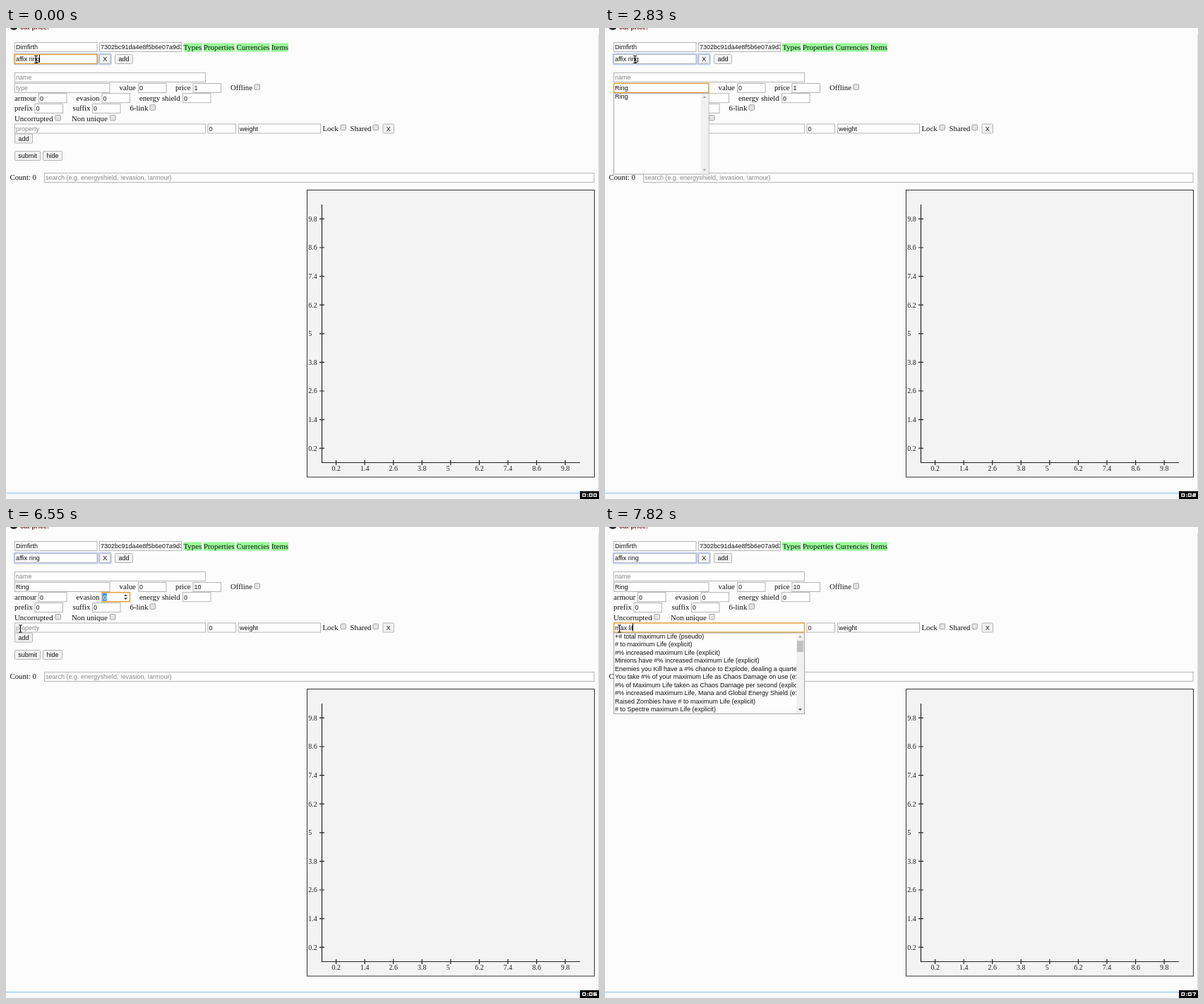
An HTML page that plays this animation: 840x667 px, repeating every 8 s.

```html
<!DOCTYPE html>
<html lang="en">
<head>
<meta charset="utf-8">
<title>Item search form</title>
<style>
html, body { margin: 0; width: 100%; height: 100%; overflow: hidden; background: #fcfcfc; }
svg { display: block; }
text { font: 9px "Liberation Sans", Arial, sans-serif; fill: #111; white-space: pre; }
.label { font: 10.8px "Liberation Serif", "Times New Roman", serif; }
.axis { font: 10px "Liberation Serif", "Times New Roman", serif; fill: #222; }
.hint { fill: #858585; }
.title { font-weight: bold; fill: #702020; }
</style>
</head>
<body>
<svg id="stage" width="840" height="667" viewBox="0 0 840 667"></svg>
<script>
const LOOP = 8000;
const stage = document.getElementById('stage');
const pen = document.createElement('canvas').getContext('2d');
pen.font = '9px "Liberation Sans", Arial, sans-serif';

// id: x, y, width, value, hint
const fields = {
  league: [12, 20, 117.5, 'Dimfirth'],
  key: [132, 20, 117, '7302bc91da4e8f5b6e07a9d3c1'],
  tab: [12, 37, 117.5, 'affix ring'],
  name: [12, 63, 271, '', 'name'],
  type: [12, 78, 135.5, '', 'type'],
  value: [187, 78, 40.5, '0'],
  price: [264.5, 78, 40.5, '1'],
  armour: [46, 92.2, 40.5, '0'],
  evasion: [135.5, 92.2, 40.5, '0'],
  shield: [250, 92.2, 40.5, '0'],
  prefix: [40.5, 107, 40.5, '0'],
  suffix: [122, 107, 40.5, '0'],
  prop: [12, 135.5, 271, '', 'property'],
  amount: [285.5, 135.5, 40.5, '0'],
  weight: [329, 135.5, 117, 'weight'],
  search: [54, 205, 779.5, '', 'search (e.g. energyshield, !evasion, !armour)']
};
const numeric = ['value', 'price', 'armour', 'evasion'];

// id: x, y, width, caption
const buttons = {
  closeTab: [132, 37, 16.5, 'X'],
  addTab: [154, 37, 26, 'add'],
  closeProp: [533.5, 135.5, 16.5, 'X'],
  addProp: [12, 149.5, 26, 'add'],
  submit: [12, 174, 37, 'submit'],
  hide: [52, 174, 28, 'hide']
};

const checks = {
  offline: [351.5, 79.3], sixLink: [203.5, 108.3], uncorrupted: [69.5, 123],
  nonUnique: [147, 123], lock: [473.5, 136.6], shared: [519.5, 136.6]
};

const labels = [
  ['value', 160.5, 88], ['price', 240, 88], ['Offline', 318, 88],
  ['armour', 12, 102.5], ['evasion', 99.5, 102.5], ['energy shield', 189, 102.5],
  ['prefix', 12, 117], ['suffix', 94.5, 117], ['6-link', 175.5, 117],
  ['Uncorrupted', 12, 131.5], ['Non unique', 93, 131.5],
  ['Lock', 448.5, 145.6], ['Shared', 487.5, 145.6], ['Count: 0', 5.5, 215]
];

const links = [['Types', 251.5, 26], ['Properties', 280, 44],
  ['Currencies', 326.5, 47], ['Items', 376, 24]];

const names = ['Ashen Lantern', 'Barrow Knot', 'Cinder Veil', 'Dusk Antler', 'Ember Husk',
  'Fallow Crown', 'Gravel Song', 'Hollow Thimble', 'Iron Murmur', 'Jagged Vow'];

const types = ['Any', 'Any Weapon', 'One-Handed Weapon', 'One-Handed Melee Weapon',
  'Two-Handed Melee Weapon', 'Bow', 'Claw', 'Any Dagger', 'Rune Dagger', 'One-Handed Axe',
  'One-Handed Mace', 'One-Handed Sword', 'Sceptre', 'Warstaff', 'Any Armour', 'Body Armour',
  'Quiver', 'Ring', 'Trinket', 'Divination Card'];

const pseudo = ['+#% total to Cold Resistance', '+#% total to Fire Resistance',
  '+#% total to Lightning Resistance', '+#% total Elemental Resistance',
  '+#% total to Chaos Resistance', '+#% total Resistance', '# total Resistances',
  '# total Elemental Resistances', '+#% total to all Elemental Resistances',
  '+# total to Strength', '+# total maximum Life', '+# total maximum Mana',
  '+# total maximum Energy Shield', '#% total increased maximum Energy Shield',
  '#% increased Movement Speed', '#% total increased Physical Damage',
  '+#% Global Critical Strike Multiplier'];

const explicit = ['# to maximum Life', '#% increased maximum Life',
  'Minions have #% increased maximum Life',
  'Enemies you Kill have a #% chance to Explode, dealing a quarter of their maximum Life',
  'You take #% of your maximum Life as Chaos Damage on use',
  '#% of Maximum Life taken as Chaos Damage per second',
  '#% increased maximum Life, Mana and Global Energy Shield',
  'Raised Zombies have # to maximum Life', '# to Spectre maximum Life'];

const props = pseudo.map(s => s + ' (pseudo)').concat(explicit.map(s => s + ' (explicit)'));
const thumbs = { type: [17, 30, 0, 0, 0], prop: [11, 11, 11, 12, 14, 14, 15, 16], name: [11] };
const lists = { name: names, type: types, prop: props };

const steps = [
  [0, { focus: 'tab', caret: 1, sec: 0 }],
  [530, { caret: 0 }],
  [850, { focus: 'closeTab' }],
  [970, { sec: 1 }],
  [1210, { focus: 'addTab' }],
  [1370, { focus: 'name', caret: 1 }],
  [1550, { focus: 'type' }],
  [1960, { sec: 2 }],
  [2050, { type: 'R' }],
  [2130, { type: 'Ri' }],
  [2220, { type: 'Rin' }],
  [2300, { type: 'Ring' }],
  [2830, { caret: 0 }],
  [2920, { focus: 'value', selected: 1 }],
  [3020, { sec: 3 }],
  [3170, { focus: 'price' }],
  [4020, { sec: 4 }],
  [4100, { selected: 0, caret: 1 }],
  [4170, { price: '10' }],
  [4340, { focus: 'offline' }],
  [4460, { focus: 'armour', selected: 1 }],
  [4640, { focus: 'evasion' }],
  [4980, { sec: 5 }],
  [5990, { sec: 6 }],
  [6760, { focus: 'prop', selected: 0, caret: 1 }],
  [7060, { sec: 7 }],
  [7260, { caret: 0 }],
  [7360, { prop: 'm', caret: 1 }],
  [7560, { prop: 'ma' }],
  [7620, { prop: 'max' }],
  [7760, { prop: 'max li' }],
  [7820, { prop: 'max lif' }]
];

const rect = (x, y, w, h, fill, stroke = 'none', width = 1, extra = '') =>
  `<rect x="${x}" y="${y}" width="${w}" height="${h}" fill="${fill}" stroke="${stroke}" stroke-width="${width}" ${extra}/>`;
const text = (s, x, y, cls = '', extra = '') =>
  `<text x="${x}" y="${y}" class="${cls}" ${extra}>${s}</text>`;
const path = (d, stroke, width = 1, fill = 'none') =>
  `<path d="${d}" fill="${fill}" stroke="${stroke}" stroke-width="${width}"/>`;
const clip = (x, y, w, h, inner) =>
  `<svg x="${x}" y="${y}" width="${w}" height="${h}" viewBox="${x} ${y} ${w} ${h}">${inner}</svg>`;
const frame = (x, y, w, h, on, fill, r = 0) =>
  rect(x + .5, y + .5, w - 1, h - 1, fill, on ? '#e0a03c' : '#b4b4b4', on ? 1.5 : 1, `rx="${r}"`);
const triangle = (x, y, up, fill) =>
  path(`M${x - 2.5} ${y + up * 1.3}h5l-2.5 ${-up * 2.8}z`, 'none', 0, fill);

function glow(x, y, w) {
  return rect(x - .3, y - .3, w + .6, 14.6, 'none', '#c6d4f8', 2.4, 'rx="1"');
}

function field(id, s) {
  const [x, y, w, initial, hint] = fields[id];
  const on = s.focus === id;
  const value = s[id] ?? initial;
  const tx = x + 2;
  const marked = on && s.selected;
  let out = frame(x, y, w, 14, on, '#fff');
  if (marked) out += rect(tx - .5, y + 1.5, 5.8, 11, '#3390ff');
  out += clip(x + 1, y, w - 2, 14,
    text(value || hint || '', tx, y + 10.3, value ? '' : 'hint', marked ? 'style="fill:#fff"' : ''));
  if (on && s.caret && !s.selected)
    out += rect(Math.floor(tx + pen.measureText(value).width - .5), y + 1, 1, 11, '#000');
  if (on && numeric.includes(id))
    out += triangle(x + w - 6.5, y + 4.6, 1, '#444') + triangle(x + w - 6.5, y + 9.4, -1, '#444');
  return out;
}

function button(id, s) {
  const [x, y, w, caption] = buttons[id];
  return frame(x, y, w, 14, s.focus === id, '#f2f2f2', 1) +
    text(caption, x + w / 2, y + 10.3, '', 'text-anchor="middle"');
}

function check(id, s) {
  const [x, y] = checks[id];
  const on = s.focus === id;
  return (on ? rect(x - .3, y - .3, 9.1, 9.1, 'none', '#e5a845', 1.5) : '') +
    rect(x + .5, y + .5, 7.5, 7.5, '#e4e4e4', '#a2a2a2', 1, 'rx="1.2"');
}

function dropdown(id, s) {
  const [x, y, w] = fields[id];
  const top = y + 14, h = 115.5, bar = x + w - 12;
  const query = s[id] || '';
  const words = query.toLowerCase().split(' ');
  const rows = lists[id].filter(row => words.every(word => row.toLowerCase().includes(word)));
  const thumb = thumbs[id][query.length] || 0;
  return rect(x + .5, top + .5, w - 1, h - 1, '#fdfdfd', '#a8a8a8') +
    clip(x + 1, top, w - 13, h,
      rows.slice(0, 10).map((row, i) => text(row, x + 2, top + 8.4 + i * 11.5)).join('')) +
    rect(bar, top + 1, 11, h - 2, '#f1f1f1') +
    triangle(bar + 5.5, top + 5.8, 1, '#a3a3a3') +
    triangle(bar + 5.5, top + 109, -1, thumb ? '#505050' : '#a3a3a3') +
    (thumb ? rect(bar + 1, top + 11.5, 9, thumb, '#c1c1c1') : '');
}

function chart() {
  let out = rect(426.5, 229.5, 407, 406.5, '#f3f3f3', '#333');
  let ticks = 'M447.5 250V615.5H813';
  for (let i = 0; i < 9; i++) {
    const x = 467.6 + i * 40.57, y = 595.2 - i * 40.6;
    const value = +(0.2 + i * 1.2).toFixed(1);
    ticks += `M${x} 612v7M444 ${y}h7`;
    out += text(value, x - 6.2, 627.3, 'axis') + text(value, 428.3, y + 3.3, 'axis');
  }
  return out + path(ticks, '#222', 1.2);
}

function digit(n, x, y) {
  const shapes = ['M0 0h3.6v3.8h-3.6z', 'M.4 0h1.6v3.8M0 3.8h3.8', 'M0 0h3.6v1.9h-3.6v1.9h4.2',
    'M0 0h3.6v3.8h-4.2M.6 1.9h3', 'M0-.6v2.5h3.6M3.6-.6v5', 'M4.2 0h-4.2v1.9h3.6v1.9h-4.2',
    'M4.2 0h-4.2v3.8h3.6v-1.9h-3.6', 'M-.6 0h4.2l-1.8 4.4'];
  return `<g transform="translate(${x} ${y})">${path(shapes[n], '#fff', 1.3)}</g>`;
}

function clock(sec) {
  return rect(813, 656, 27, 11, '#000') + digit(0, 817, 659.6) +
    rect(823.4, 660, 1.4, 1.3, '#fff') + rect(823.4, 662.6, 1.4, 1.3, '#fff') +
    digit(0, 826.6, 659.6) + digit(sec, 832.7, 659.6);
}

function pointer([x, y]) {
  if (x < 12 || (y > 51 && y < 63))
    return path(`M${x} ${y}v10.5l2.5-2.3 1.8 3.8 1.6-.7-1.7-3.7h3.3z`, '#000', .8, '#fff');
  return path(`M${x - 2.5} ${y - 5}h2l.5.5.5-.5h2M${x} ${y - 4.5}v9M${x - 2.5} ${y + 5}h2l.5-.5.5.5h2`, '#111', 1.1);
}

// Cubic path travelled in small hops
function pointerAt(t) {
  const hop = Math.floor((t - 5830) / 55 + 1) / 14;
  const k = Math.min(1, Math.max(0, hop));
  const u = k * k * (3 - 2 * k), v = 1 - u;
  const curve = (a, b, c, d) => v * v * v * a + 3 * v * v * u * b + 3 * v * u * u * c + u * u * u * d;
  return [curve(42.5, 8, -18, 20.5), curve(44.5, 60, 112, 144)];
}

function backdrop() {
  return rect(0, 0, 840, 667, '#fcfcfc') +
    '<circle cx="11" cy="-3" r="6" fill="#2a2a2e"/>' + text('oat-price:', 20, 1.5, 'title') +
    links.map(([s, x, w]) => rect(x, 21.5, w, 12, '#98fb98') + text(s, x, 31, 'label')).join('') +
    labels.map(([s, x, y]) => text(s, x, y, 'label')).join('') + chart() +
    rect(839, 9, 1, 649, '#dcdcdc') + rect(0, 658, 840, 1.5, '#98cbf3') +
    rect(0, 659.5, 840, 7.5, '#f6f7f8');
}

const base = backdrop();

function draw(s) {
  const each = (table, fn) => Object.keys(table).map(id => fn(id, s)).join('');
  stage.innerHTML = base + glow(12, 37, 117.5) + glow(132, 37, 16.5) +
    each(fields, field) + each(buttons, button) + each(checks, check) +
    (lists[s.focus] ? dropdown(s.focus, s) : '') +
    pointer(s.mouse) + clock(s.sec);
}

let last = '';
function tick() {
  const t = performance.now() % LOOP;
  const state = Object.assign({ mouse: pointerAt(t) },
    ...steps.filter(([at]) => at <= t).map(([, patch]) => patch));
  const key = JSON.stringify(state);
  if (key !== last) draw(state);
  last = key;
  requestAnimationFrame(tick);
}
tick();
</script>
</body>
</html>
```
